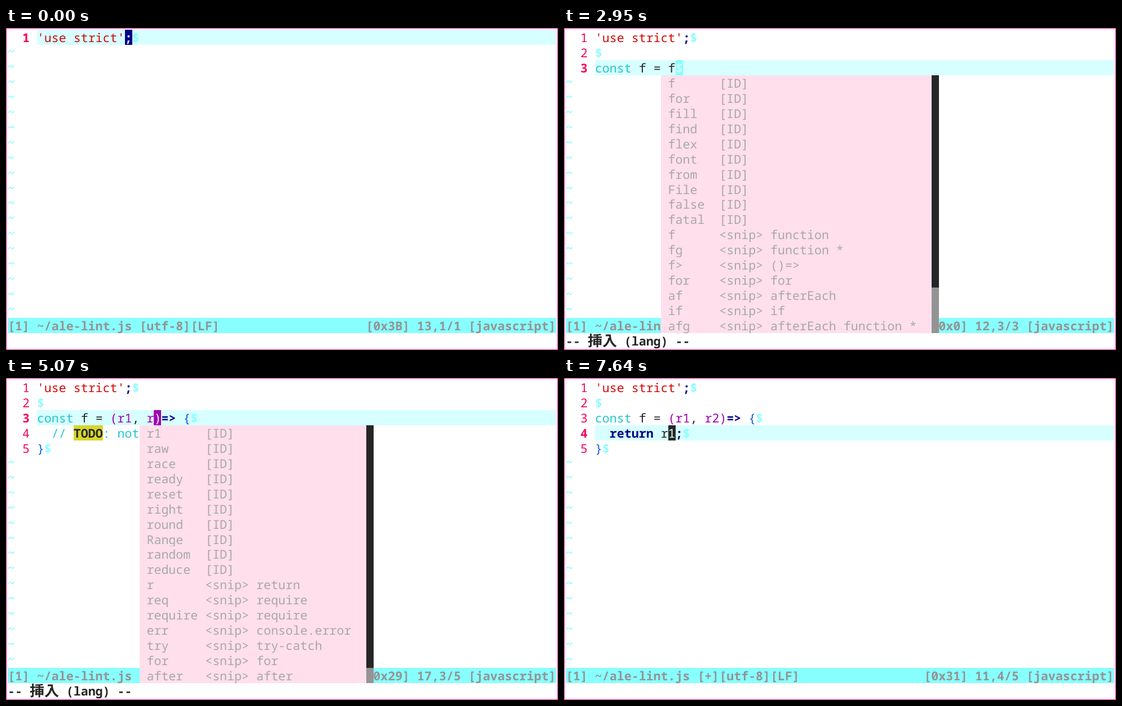
Animation of 979x572 px, one loop 8000 ms. Source, as an HTML page:

```html
<!DOCTYPE html>
<html lang="en">
<head>
<meta charset="utf-8">
<title>Editor session</title>
<style>
  html, body { margin: 0; width: 100%; height: 100%; overflow: hidden; background: #fff; }
  #screen {
    position: relative; width: 979px; height: 572px; overflow: hidden; background: #fff;
    font: 21.622px 'Noto Sans Mono', 'DejaVu Sans Mono', monospace;
    text-rendering: geometricPrecision; font-variant-ligatures: none;
  }
  #screen::after { content: ''; position: absolute; inset: 0; border: 1px solid #ff0087; }
  #screen span {
    --c: #262626; position: absolute; line-height: 29px;
    white-space: pre; color: var(--c);
  }
  #screen .num { --c: #f5055f; }
  #screen .now { font-weight: 700; }
  #screen .line { background: #d7ffff; }
  #screen .tilde { --c: #87ffff; font-weight: 700; margin-top: -3px; }
  #screen .eol { --c: #87ffff; font-weight: 700; }
  #screen .str { --c: #d20a0a; }
  #screen .kw, #screen .cm { --c: #22c6cd; }
  #screen .op { --c: #000087; font-weight: 700; }
  #screen .brace { --c: #0a5fdc; }
  #screen .arg { --c: #a300b0; }
  #screen .todo { background: #d7d72b; font-weight: 700; }
  #screen .sel { background: #33ccd5; color: #d0d0d0; }
  #screen .todo.sel { background: #262626; color: #e0e0e0; }
  #screen .inv { background: #d0d0d0; color: #33ccd5; }
  #screen .cur { background: var(--c); color: #d7ffff; }
  #screen .stat { --c: #949494; background: #87ffff; font-weight: 700; }
  #screen .stat.cur { background: #949494; color: #87ffff; }
  #screen .msg { font-weight: 700; }
  #screen .cjk { font: 700 26px 'Noto Sans CJK JP', 'Noto Sans CJK', sans-serif; line-height: 27px; margin-top: -1px; }
  #screen .menu { --c: #a8a8a8; background: #ffdfeb; }
  #screen .track { background: #262626; }
  #screen .thumb { background: #949494; }
</style>
</head>
<body>
<div id="screen"></div>
<script>
const W = 12.973, H = 26.95, PAD = 3, COLS = 75, STATUS = 19, GUTTER = 4, LOOP = 8000;
const view = document.getElementById('screen');

// Completion menus: "word" is an identifier, "word=text" a snippet.
const menu = (kind, width, thumb, list) => ({ kind, width, thumb, items: list.split(',') });
const F = 'f,for,fill,find,flex,font,from,File,false,fatal,f=function,fg=function *,f>=()=>,' +
  'for=for,af=afterEach,if=if,afg=afterEach function *';
const R = 'raw,race,ready,reset,right,round,Range,random,reduce,r=return,req=require,' +
  'require=require,err=console.error,try=try-catch,for=for,after=after';
const menuC = menu(17, 32, 3, 'c,cos,cap,call,ceil,cosh,code,case,catch,class,c=class,co=const,' +
  'cl=console.log,ce=console.error,case=case,do=do,desc=describe');
const menuCo = menu(17, 30, 0, 'careOf,createObjectURL,cos,cosh,color,const,count,concat,cookie,columns,co=const');
const menuF = menu(8, 38, 3, F);
const menuArrow = menu(4, 17, 0, 'f>=()=>');
const menuR = menu(9, 32, 1, R + ',or=or');
const menuR1 = menu(9, 32, 1, 'r1,' + R);
const menuR2 = menu(9, 32, 1, 'r1,r2,' + R);

const TOP = "'use strict';\n\n";
const body = head => TOP + head + '\n  // TODO: not implemented yet\n}';
const fn = args => body(`const f = (${args})=> {`);
const done = line => `${TOP}const f = (r1, r2)=> {\n  ${line}\n}`;
const picked = TOP + 'const f = (r1, r2)=> {\n  // TODO: not implemented ye|t\n}';
const select = { mode: 'セレクト', sel: true };

// [time, text with | at the cursor, options]
const steps = [
  [0, "'use strict'|;", { mode: '', saved: true }],
  [570, "'use strict';\n|", { mode: '' }],
  [610, "'use strict';\n|"],
  [780, TOP + '|'],
  [1120, TOP + 'c|'],
  [1160, TOP + 'c|', { menu: menuC }],
  [1330, TOP + 'co|', { menu: menuCo }],
  [1370, TOP + 'co|', { menu: menuCo, mode: '', park: 'message' }],
  [1410, TOP + 'const |'],
  [1750, TOP + 'const f|'],
  [1790, TOP + 'const f|', { menu: menuF }],
  [2400, TOP + 'const f |'],
  [2570, TOP + 'const f =|'],
  [2630, TOP + 'const f = |'],
  [2910, TOP + 'const f = f|'],
  [2950, TOP + 'const f = f|', { menu: menuF }],
  [3120, TOP + 'const f = f>|', { menu: menuArrow, back: 2 }],
  [3470, fn('|'), { park: 'status' }],
  [3510, fn('|')],
  [3820, fn('r|')],
  [3860, fn('r|'), { menu: menuR }],
  [4160, fn('r1|'), { park: 'status' }],
  [4200, fn('r1|')],
  [4540, fn('r1,|')],
  [4640, fn('r1, |')],
  [5030, fn('r1, r|')],
  [5070, fn('r1, r|'), { menu: menuR1 }],
  [5340, fn('r1, r2|'), { park: 'status' }],
  [5380, fn('r1, r2|')],
  [5720, picked, { ...select, park: 'status' }],
  [5760, picked, select],
  [6120, picked, { ...select, park: 'start' }],
  [6160, done('r|'), { mode: '' }],
  [6270, done('return |;')],
  [6880, done('return r|;')],
  [6920, done('return r|;'), { menu: menuR2 }],
  [7120, done('return r1|;')],
  [7600, done('return r|1;'), { mode: '', park: 'status' }],
  [7640, done('return r|1;'), { mode: '' }]
];

const rules = [
  [/[{}()]/g, 'brace'],
  [/\((r\d?(, r\d?)?)?\)/g, 'arg'],
  [/,/g, ''],
  [/'.*?'/g, 'str'],
  [/const/g, 'kw'],
  [/return|=>|;/g, 'op'],
  [/\/\/.*/g, 'cm'],
  [/TODO/g, 'todo']
];

const escapeHtml = s => s.replace(/&/g, '&amp;').replace(/</g, '&lt;');
const rowTop = row => Math.round(PAD + row * H);

function put(row, col, text, cls, cells = text.length) {
  const top = rowTop(row), height = rowTop(row + 1) - top;
  const box = `left:${PAD + col * W}px;top:${top}px;width:${cells * W}px;height:${height}px`;
  return `<span class="${cls}" style="${box}">${escapeHtml(text)}</span>`;
}

function classesOf(line) {
  const cls = Array(line.length).fill('');
  for (const [re, name] of rules) {
    for (const m of line.matchAll(re)) cls.fill(name, m.index, m.index + m[0].length);
  }
  return [...cls, 'eol'];
}

function drawLine(row, line, cursor, opts) {
  const cls = classesOf(line), text = line + '$';
  if (cursor >= 0) {
    if (opts.sel) {
      for (let i = 2; i < cursor; i++) cls[i] += ' sel';
      if (opts.park === 'start') cls[2] += ' inv';
    }
    if (!opts.park) cls[cursor] += ' cur';
  }
  let html = '';
  for (let i = 0, j; i < text.length; i = j) {
    for (j = i + 1; j < text.length && cls[j] === cls[i];) j++;
    html += put(row, GUTTER + i, text.slice(i, j), cls[i]);
  }
  return html;
}

function drawMenu({ kind, width, thumb, items }, row, col) {
  const count = Math.min(items.length, STATUS - row);
  const inner = thumb ? width - 1 : width;
  let html = '';
  for (let i = 0; i < count; i++) {
    const [, word, snip] = items[i].match(/^(.+?)(?:=(.+))?$/);
    const label = snip ? '<snip> ' + snip : '[ID]';
    const y = row + 1 + i;
    html += put(y, col, (' ' + word).padEnd(kind) + label, 'menu', inner);
    if (thumb) html += put(y, col + inner, '', i < count - thumb ? 'track' : 'thumb', 1);
  }
  return html;
}

function drawStatus(row, col, lines, opts) {
  const code = (lines[row].charCodeAt(col) || 0).toString(16).toUpperCase();
  const left = `[1] ~/ale-lint.js ${opts.saved ? '' : '[+]'}[utf-8][LF]`;
  const right = `[0x${code}] ${col + 1},${row + 1}/${lines.length} [javascript]`;
  const bar = left + right.padStart(COLS - left.length);
  const comma = bar.lastIndexOf(',');
  return put(STATUS, 0, bar, 'stat') +
    (opts.park === 'status' ? put(STATUS, comma, ',', 'stat cur') : '');
}

function drawMessage({ mode = '挿入 (lang)', park }) {
  const row = STATUS + 1;
  if (park === 'message') return put(row, 0, ' ', 'cur');
  if (!mode) return '';
  const [wide, rest = ''] = mode.split(/(?= )/);
  const cells = wide.length * 2;
  return put(row, 0, '--', 'msg') + put(row, 3, wide, 'cjk', cells) +
    put(row, 3 + cells, rest + ' --', 'msg');
}

function draw([, source, opts = {}]) {
  const before = source.split('|')[0].split('\n');
  const row = before.length - 1, col = before[row].length;
  const lines = source.replace('|', '').split('\n');
  let html = opts.sel ? '' : put(row, GUTTER, '', 'line', COLS - GUTTER);
  for (let y = 0; y < STATUS; y++) {
    if (y < lines.length) {
      html += put(y, 2, String(y + 1), y === row ? 'num now' : 'num');
      html += drawLine(y, lines[y], y === row ? col : -1, opts);
    } else {
      html += put(y, 0, '~', 'tilde');
    }
  }
  html += drawStatus(row, col, lines, opts) + drawMessage(opts);
  if (opts.menu) {
    const word = before[row].match(/\w*$/)[0].length;
    html += drawMenu(opts.menu, row, GUTTER + col - (opts.back || word) - 1);
  }
  view.innerHTML = html;
}

let shown = -1;
function tick() {
  const t = performance.now() % LOOP;
  const i = steps.findLastIndex(s => s[0] <= t);
  if (i !== shown) draw(steps[shown = i]);
  requestAnimationFrame(tick);
}
tick();
</script>
</body>
</html>
```
